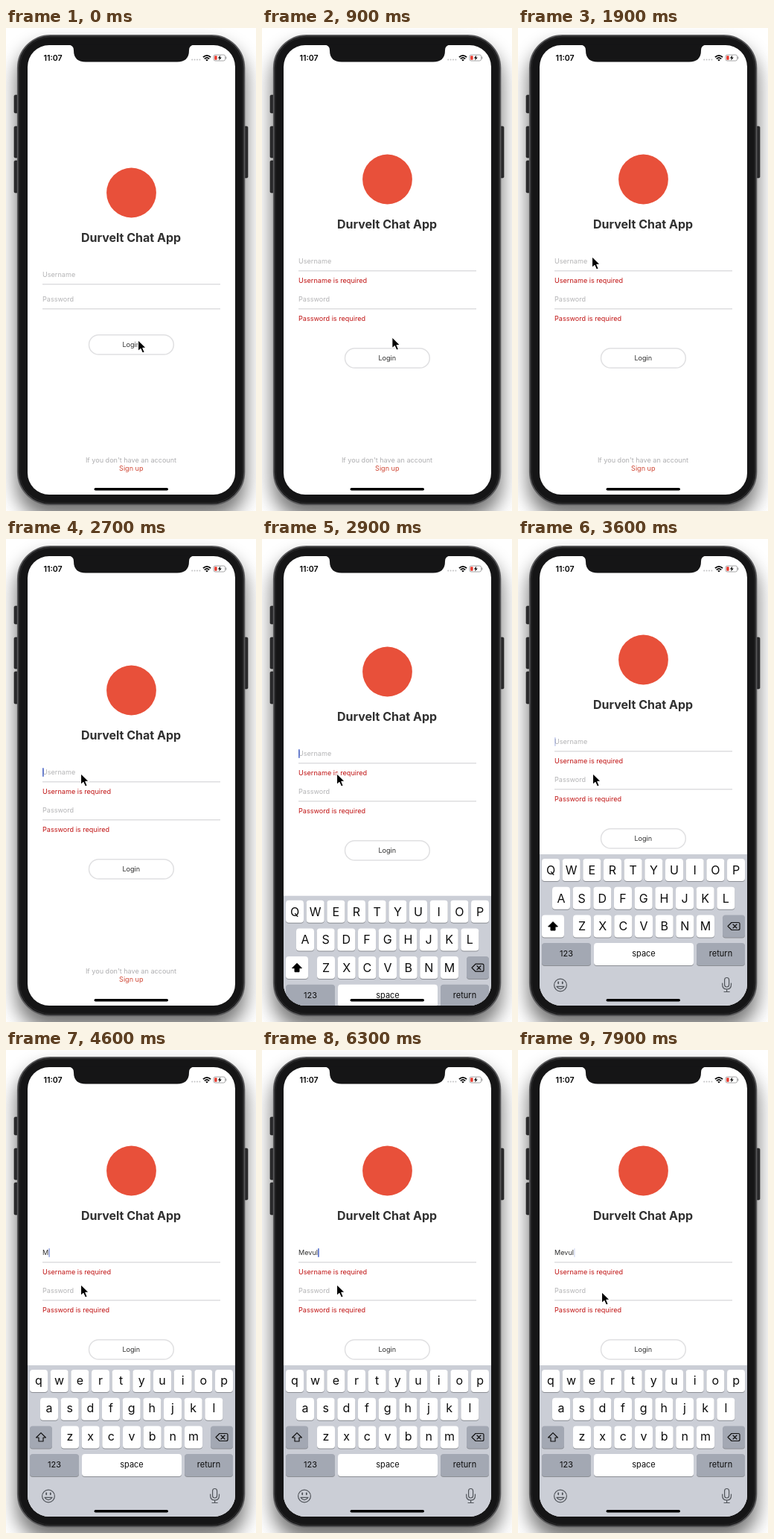
These frames come from a looping animation (336x648 px, 8000 ms). An HTML page:

```html
<!DOCTYPE html>
<html lang="en">
<head>
<meta charset="utf-8">
<title>Login screen</title>
<style>
  html, body { margin: 0; width: 100%; height: 100%; overflow: hidden; background: #fff; }
  svg { display: block; width: 100vw; height: 100vh; }
  text { font-family: Inter, Roboto, sans-serif; font-size: 9.1px; fill: #303030; }
  .mid { text-anchor: middle; }
  .hint { fill: #b4b4b6; }
  .error { fill: #c01414; }
  .rule { stroke: #dedee0; stroke-width: 1.6; }
  .key { font-size: 16px; fill: #0c0c0c; }
  .word { font-size: 11px; fill: #0c0c0c; }
  .icon { fill: none; stroke: #50545a; stroke-width: 1.2; stroke-linecap: round; stroke-linejoin: round; }
</style>
</head>
<body>
<svg viewBox="0 0 336 648">
  <defs>
    <filter id="blur" x="-30%" y="-30%" width="160%" height="160%"><feGaussianBlur stdDeviation="13"/></filter>
    <clipPath id="screen"><rect x="29" y="23" width="279" height="603" rx="29"/></clipPath>
  </defs>

  <rect width="336" height="648" fill="#fff"/>
  <rect x="14" y="24" width="308" height="634" rx="46" fill="#000" opacity=".55" filter="url(#blur)"/>

  <g fill="#2b2b2d" stroke="#151515" stroke-width=".6">
    <rect x="11" y="90" width="7" height="24" rx="1.5"/>
    <rect x="11" y="132" width="7" height="42" rx="1.5"/>
    <rect x="11" y="178" width="7" height="43" rx="1.5"/>
    <rect x="318" y="132" width="7" height="69" rx="1.5"/>
  </g>
  <rect x="15.8" y="9.8" width="304.6" height="629.6" rx="44" fill="#151516" stroke="#58585a" stroke-width="1.8"/>
  <rect x="18" y="12" width="300.2" height="625.2" rx="42" fill="none" stroke="#2a2a2b" stroke-width="1"/>
  <rect x="29" y="23" width="279" height="603" rx="29" fill="#fff"/>

  <g clip-path="url(#screen)">
    <g id="top">
      <circle cx="168.5" cy="221" r="33.4" fill="#e8503a"/>
      <text class="mid" x="168" y="287" style="font-size:16px;font-weight:650">Durvelt Chat App</text>
      <text id="userHint" class="hint" x="49" y="334">Username</text>
      <text id="user" x="49" y="334"></text>
      <rect id="caret" y="325.2" width="1.4" height="11.6" fill="#3a57c4"/>
      <path class="rule" d="M49 343.7H288"/>
      <text class="error" x="49" y="360">Username is required</text>
    </g>
    <g id="middle">
      <text class="hint" x="49" y="367">Password</text>
      <path class="rule" d="M49 376.7H288"/>
      <text class="error" x="49" y="393">Password is required</text>
    </g>
    <g id="login">
      <rect x="111.5" y="411.7" width="113.8" height="26.4" rx="13.2" fill="#fff" stroke="#e0e0e2" stroke-width="1.5"/>
      <text class="mid" x="168.3" y="428.2">Login</text>
    </g>
    <text class="mid" x="168" y="582.7" style="fill:#aeaeb0">If you don't have an account</text>
    <text class="mid" x="168.3" y="594" style="fill:#d04a38">Sign up</text>
    <g id="board"></g>
    <rect x="118.5" y="617" width="99.5" height="3.6" rx="1.8" fill="#000"/>
  </g>

  <path d="M84 22.5Q91 23 91 30Q91 45.5 107 45.5H230Q246 45.5 246 30Q246 23 253 22.5Z" fill="#151516"/>
  <text x="50.5" y="43.7" style="font-size:10.6px;font-weight:600;fill:#000">11:07</text>
  <path d="M250.2 42.5H261" stroke="#c2c2c4" stroke-width="2" stroke-linecap="round" stroke-dasharray="0 3.4"/>
  <g fill="none" stroke="#000" stroke-width="1.7">
    <path d="M264.9 39.2Q270 34.4 275.1 39.2"/>
    <path d="M266.8 41.3Q270 38.3 273.2 41.3"/>
  </g>
  <path d="M268.2 42.7Q270 41.2 271.8 42.7L270 44.6Z"/>
  <rect x="279" y="36" width="15.6" height="8" rx="2.2" fill="#fff" stroke="#9c9c9e" stroke-width=".9"/>
  <rect x="280.2" y="37.2" width="3.4" height="5.6" rx="1" fill="#e8392d"/>
  <path d="M295.8 38.6V41.4" stroke="#9c9c9e" stroke-width="1.1"/>
  <path d="M288.2 36.6L284.8 40.6H287L286.2 43.6L289.8 39.4H287.5Z"/>

  <path id="pointer" d="M0 0V15.2L3.5 12L6 17.6L8.7 16.4L6.3 10.9H11Z" stroke="#fff" stroke-width="1.1" stroke-linejoin="round"/>
</svg>

<script>
const LOOP = 8000, STEP = 100;
const NAME = "Mevul";
const typed = [4000, 4900, 5300, 5700, 6200];
const focus = 2700, rise = 450, failed = 700;
const path = [[0, 177.5, 418.5], [800, 177.5, 418.5], [1700, 99.5, 306.5], [2000, 99.5, 306.5],
  [2400, 100.5, 314.5], [7400, 100.5, 314.5], [7900, 112.5, 324.5]];

const $ = id => document.getElementById(id);
const errors = document.querySelectorAll(".error");
const clamp = v => Math.max(0, Math.min(1, v));
const easeOut = (u, n) => 1 - (1 - clamp(u)) ** n;
const move = (id, x, y) => $(id).setAttribute("transform", `translate(${x} ${y})`);
const show = (el, on) => el.setAttribute("visibility", on ? "visible" : "hidden");

const cap = (x, y, w, fill = "#fff") =>
  `<rect x="${x}" y="${y + 1}" width="${w}" height="30" rx="4" fill="#8b8e94"/>` +
  `<rect x="${x}" y="${y}" width="${w}" height="30" rx="4" fill="${fill}"/>`;
const label = (x, y, s, cls) => `<text class="mid ${cls}" x="${x}" y="${y}">${s}</text>`;

// The keyboard is drawn with its top edge at y = 0.
function buildBoard() {
  const gray = "#a3a8b3", pitch = 27.67;
  const rows = [["qwertyuiop", 44], ["asdfghjkl", 58], ["zxcvbnm", 86]];
  let keys = "", lower = "", upper = "";
  rows.forEach(([letters, x0], r) => {
    const y = 6 + r * 37.7;
    [...letters].forEach((c, i) => {
      const x = x0 + i * pitch;
      keys += cap(x - 12, y, 24);
      lower += label(x, y + 19.7, c, "key");
      upper += label(x, y + 20.8, c.toUpperCase(), "key");
    });
  });
  const arrow = "M47 90.6L40.6 97H44V102H50V97H53.4Z";
  upper += cap(32, 81.4, 30) + `<path d="${arrow}" stroke="#000" stroke-linejoin="round"/>`;
  lower += cap(32, 81.4, 30, gray) + `<path class="icon" d="${arrow}" style="stroke:#111"/>`;
  keys += cap(275, 81.4, 30, gray) +
    `<path class="icon" style="stroke:#111" d="M287 91.5H296Q298 91.5 298 93.5V99.5Q298 101.5 296 101.5H287L282 96.5ZM289 94L294 99M294 94L289 99"/>` +
    cap(32, 119, 66, gray) + label(65, 137.3, "123", "word") +
    cap(102, 119, 134) + label(169, 137, "space", "word") +
    cap(240, 119, 65, gray) + label(272.5, 137, "return", "word") +
    `<g class="icon"><circle cx="57" cy="175.5" r="8.4"/><path d="M52 177.3Q57 184 62 177.3Z"/>
     <path d="M54.2 171.3V173.3M59.8 171.3V173.3" stroke-width="1.8"/>
     <rect x="277.6" y="165.5" width="6" height="12.5" rx="3"/>
     <path d="M274.7 173V175Q274.7 181 280.6 181Q286.5 181 286.5 175V173M280.6 181V184.5M277 184.5H284.2"/></g>`;
  $("board").innerHTML = `<rect x="29" width="279" height="230" fill="#cbced6"/>${keys}<g id="lower">${lower}</g><g id="upper">${upper}</g>`;
}

function pointerAt(t) {
  const i = Math.max(1, path.findIndex(p => p[0] >= t));
  const [t0, x0, y0] = path[i - 1], [t1, x1, y1] = path[i];
  const u = clamp((t - t0) / (t1 - t0)), e = u * u * (3 - 2 * u);
  return [x0 + (x1 - x0) * e, y0 + (y1 - y0) * e];
}

function caretAlpha(phase) {
  const p = phase % 1000;
  return p < 850 ? 1 - clamp((p - 500) / 250) : (p - 850) / 150;
}

function render(t) {
  const invalid = t >= failed, grow = invalid ? 18 : 0;
  const u = (t - focus) / rise;
  const lift = 41 * easeOut(u, 1.6);
  move("top", 0, -grow - lift);
  move("middle", 0, -lift);
  move("login", 0, grow - lift);
  move("board", 0, 626 - 203 * easeOut(u, 2.2));
  move("pointer", ...pointerAt(t));
  errors.forEach(el => show(el, invalid));

  const count = typed.filter(k => t >= k).length;
  $("user").textContent = NAME.slice(0, count);
  show($("userHint"), !count);
  show($("upper"), !count);
  show($("lower"), count);

  const since = t - (count ? typed[count - 1] : focus);
  $("caret").setAttribute("x", 49.2 + (count ? $("user").getComputedTextLength() : 0));
  $("caret").setAttribute("opacity", since < 0 ? 0 : caretAlpha(since));
}

buildBoard();
const start = performance.now();
function tick() {
  const t = (performance.now() - start) % LOOP;
  render(Math.floor(t / STEP) * STEP);
  requestAnimationFrame(tick);
}
tick();
</script>
</body>
</html>
```
